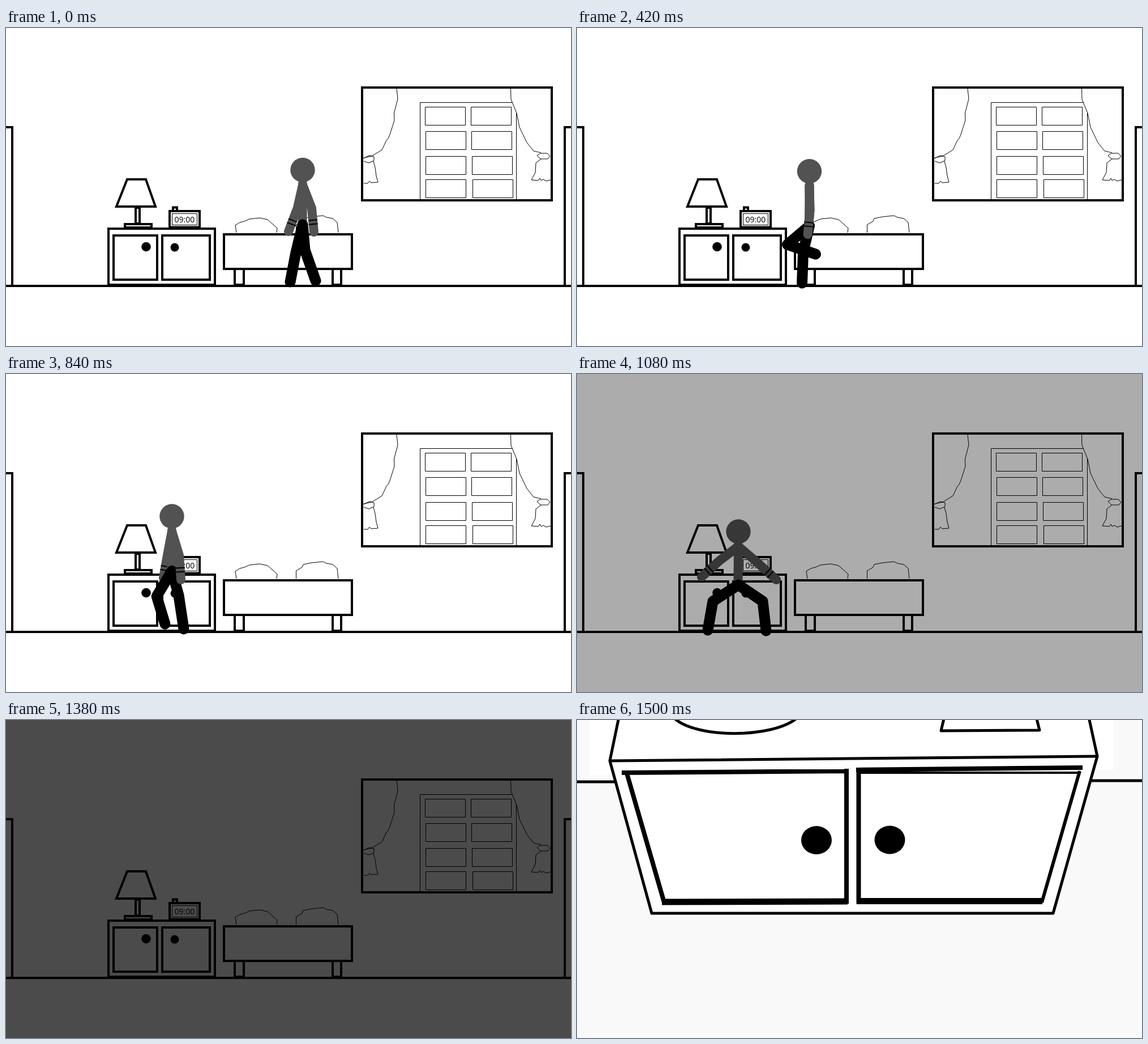
An HTML page that plays this animation: 998x561 px, repeating every 2.85 s.

```html
<!DOCTYPE html>
<html lang="en">
<head>
<meta charset="utf-8">
<title>Bedtime walk</title>
<style>
  html, body { margin: 0; width: 100%; height: 100%; overflow: hidden; background: #fff; }
  svg { display: block; width: 100vw; height: 100vh; }
  .line { fill: none; stroke: #000; stroke-width: 4; }
  .thin { fill: none; stroke: #000; stroke-width: 1; }
  .limb { fill: none; stroke-linecap: round; stroke-linejoin: round; }
  .arm { stroke: #525252; stroke-width: 16; }
  .leg { stroke: #000; stroke-width: 19; }
  .band { fill: none; stroke: #000; stroke-width: 2; }
  .thick { stroke-width: 8; }
  text { font: 14px "Open Sans", "Noto Sans", sans-serif; }
</style>
</head>
<body>
<svg viewBox="0 0 998 561">
  <g id="room">
    <rect width="998" height="561" fill="#fff"/>
    <g class="thin">
      <path d="M731.5 303V131.5H895M901.5 150V303"/>
      <path id="panes"/>
      <path d="M690 107L692 125 685.5 150 686 163 678 188 675 195 672 198 664 215 646 226 632 229
        M631 230L642 225 650 227 650 234 641 238 632 235
        M632 274H639L642 270 645 273 657 272 654 261 652 246 649 235"/>
      <path d="M891.5 107L892 126 902 150 907 175 920 202 932 217 945 220
        M938 225L944 221 956 221 961 226 957 231 944 231Z
        M945 231L936 238 935 255 928 268 940 269 943 265 945 269 949 267 954 270 962 268"/>
      <path d="M407 361L405 348 413 343 421 341 430 337 448 335 462 338 470 345 479 353 478 361"/>
      <path d="M512.5 361V347L523 341 525 336 540 333 560 331 566 334 577 336 585 343 587 361"/>
    </g>
    <g class="line">
      <path d="M0 175H11V455M998 175H987V455M0 455H998"/>
      <path d="M629 105H964V304H629Z"/>
      <path d="M214 267H247L264 315H195ZM229 317H236V345H229ZM210 346H257V352H210Z"/>
      <path d="M289 323H342V351.5H289ZM295 323V316.500H302V323"/>
      <path d="M181 354H369V453H181ZM190 366H267V444H190ZM276 366H360V444H276Z"/>
      <path d="M385 364H611V425H385ZM404 425H420V453H404ZM577 425H592V453H577Z"/>
    </g>
    <rect class="thin" x="293.5" y="327.500" width="44" height="20"/>
    <text x="297.500" y="343">09:00</text>
    <circle cx="247.500" cy="386" r="8.300"/>
    <circle cx="298" cy="387" r="7.500"/>
    <g id="figure">
      <path id="farArm" class="limb arm"/><path id="farBand" class="band"/>
      <path id="torso" class="limb arm"/>
      <circle id="head" r="21.700" fill="#525252"/>
      <path id="legs" class="limb leg"/>
      <path id="nearArm" class="limb arm"/><path id="nearBand" class="band"/>
    </g>
    <rect id="shade" width="998" height="561"/>
  </g>
  <g id="closeup" visibility="hidden">
    <rect width="998" height="561" fill="#f9f9f9"/>
    <path d="M22 0H948V88L22 98Z" fill="#fff"/>
    <path class="line" style="stroke-width:5" d="M0 109H70M908 107H998"/>
    <g class="line" style="stroke-width:5;stroke-linejoin:round">
      <path fill="#fff" d="M74 -5L58 72 132 341H841L919 64 904 -5"/>
      <path d="M58 72L919 64M172 -3C210 32.500 345 32.500 388 -3M648 -2L643 19 817 18 812 -2"/>
    </g>
    <g class="line thick">
      <path d="M79 93L479 90M476 86V324M88 94L154 322"/>
      <path d="M150 321L478 320" stroke-width="11"/>
      <path d="M497.500 84V324M493 88L893 84"/>
      <path d="M494 319.500H822" stroke-width="11"/>
      <path d="M500 93L888 93" stroke-width="4"/>
      <path d="M888 90L821 322" stroke-width="6"/>
    </g>
    <ellipse cx="423" cy="212" rx="27" ry="25"/>
    <ellipse cx="552.500" cy="211.500" rx="27" ry="25"/>
  </g>
</svg>
<script>
const LOOP = 2850, STEP = 30, CYCLE = 347, WALK_END = 870, CROUCH_END = 1080, CUT = 1500;
const $ = id => document.getElementById(id);
const mix = (a, b, k) => a.map((v, i) => v + (b[i] - v) * k);
const clamp = v => Math.max(0, Math.min(1, v));

// Phase, then [joint x, y, end x, y]; x is measured from the body.
const legKeys = [
  [0, [-12, 396, -22, 448]], [.21, [-11, 395, -13, 450]], [.42, [12, 390, 21, 450]],
  [.5, [4, 392, 23, 446]], [.71, [-39, 382, 11, 399]], [.92, [-27, 392, -12, 441]],
  [1, [-12, 396, -22, 448]]
];
const armKeys = [
  [0, [-9, 317, -25, 359]], [.21, [1, 322, -3, 364]], [.42, [13, 320, 16, 363]],
  [.5, [16, 318, 20, 360]], [.71, [1, 322, -3, 364]], [.92, [-8, 320, -15, 360]],
  [1, [-9, 317, -25, 359]]
];
const bodyKeys = [[0, [524]], [420, [410.5]], [840, [293]], [870, [285]]];
const crouch = {
  trunk: [278, 302, 372],
  legs: [[-45, 401, -54, 452], [43, 401, 49, 453]],
  arms: [[-33, 329, -65, 358], [34, 333, 67, 363]]
};

function sample(keys, t) {
  const i = Math.max(1, keys.findIndex(k => k[0] >= t));
  const [t0, a] = keys[i - 1], [t1, b] = keys[i];
  return mix(a, b, (t - t0) / (t1 - t0));
}

function walkPose(t) {
  const p = t / CYCLE % 1, q = (p + .5) % 1;
  const dip = 1 - Math.cos(4 * Math.PI * p);
  return {
    trunk: [250.5 + dip * 1.2, 275 + dip, 347 + dip],
    legs: [sample(legKeys, p), sample(legKeys, q)],
    arms: [sample(armKeys, p), sample(armKeys, q)]
  };
}

function pose(t) {
  const w = walkPose(Math.min(t, WALK_END));
  const k = clamp((t - WALK_END) / (CROUCH_END - WALK_END));
  // The near arm trails when the walk stops, so it opens to the right.
  const pair = (a, b) => [mix(a[0], b[1], k), mix(a[1], b[0], k)];
  return {
    trunk: mix(w.trunk, crouch.trunk, k),
    legs: pair(w.legs, crouch.legs),
    arms: pair(w.arms, crouch.arms)
  };
}

const limb = (y, [jx, jy, ex, ey]) => `M0 ${y}L${jx} ${jy} ${ex} ${ey}`;

function bands([jx, jy, ex, ey]) {
  const len = Math.hypot(jx - ex, jy - ey), ux = (jx - ex) / len, uy = (jy - ey) / len;
  return [14, 21].map(d => {
    const x = ex + ux * d, y = ey + uy * d;
    return `M${x - uy * 8} ${y + ux * 8}L${x + uy * 8} ${y - ux * 8}`;
  }).join('');
}

function drawFigure(t) {
  const { trunk: [head, shoulder, hip], legs, arms } = pose(t);
  const x = sample(bodyKeys, Math.min(t, WALK_END))[0];
  const set = (id, d) => $(id).setAttribute('d', d);
  $('figure').setAttribute('transform', `translate(${x})`);
  $('head').setAttribute('cy', head);
  set('torso', `M0 ${shoulder}L-.5 ${hip - 4}`);
  set('legs', legs.map(l => limb(hip, l)).join(''));
  ['near', 'far'].forEach((side, i) => {
    set(side + 'Arm', limb(shoulder + 2, arms[i]));
    set(side + 'Band', bands(arms[i]));
  });
}

function darkness(t) {
  return t < 1320 ? clamp((t - 1022) / 178) : 1 - clamp((t - 1320) / 204);
}

function render(time) {
  const t = Math.floor(time % LOOP / STEP) * STEP;
  const show = (id, on) => $(id).setAttribute('visibility', on ? 'visible' : 'hidden');
  show('room', t < CUT);
  show('closeup', t >= CUT);
  show('figure', t < 1200);
  $('shade').setAttribute('opacity', darkness(t));
  if (t < 1200) drawFigure(t);
}

const rows = [139, 182.5, 226, 267];
$('panes').setAttribute('d', rows.map((y, i) =>
  [740.5 + Math.min(i, 1), 821.5 + i].map(x => `M${x} ${Math.floor(y) + .5}h71v32h-71z`).join('')).join(''));

const start = performance.now();
function tick() {
  render(performance.now() - start);
  requestAnimationFrame(tick);
}
tick();
</script>
</body>
</html>
```
